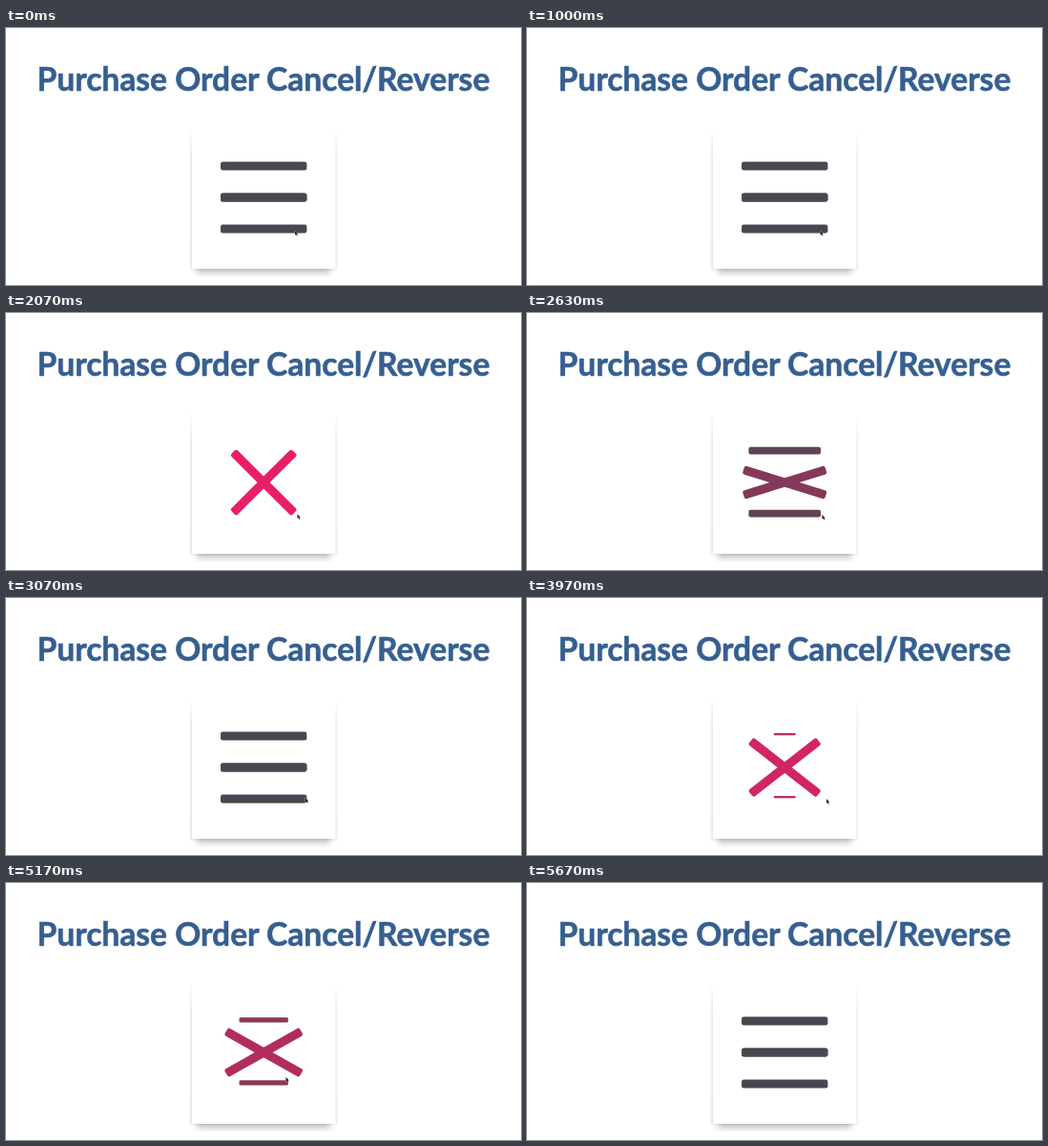
Write an HTML page that moves like this. It is 540x270 px and loops after 6030 ms.

```html
<!DOCTYPE html>
<html lang="en">
<head>
<meta charset="utf-8">
<title>Purchase Order Cancel/Reverse</title>
<style>
  html, body { margin: 0; width: 100%; height: 100%; overflow: hidden; background: #fff; }
  svg { display: block; width: 540px; height: 270px; }
  text {
    font: bold 33.6px Lato, Carlito, sans-serif; text-anchor: middle;
    fill: #365f91; stroke: #365f91; stroke-width: .6px;
  }
</style>
</head>
<body>
<svg viewBox="0 0 540 270">
  <defs>
    <clipPath id="area"><rect x="192" y="104" width="156" height="158"/></clipPath>
    <filter id="soft" x="-20%" y="-40%" width="140%" height="180%"><feGaussianBlur stdDeviation="3.2"/></filter>
    <filter id="edge" x="-20%" y="-20%" width="140%" height="140%"><feGaussianBlur stdDeviation="1"/></filter>
    <linearGradient id="fade" x1="0" y1="104" x2="0" y2="135" gradientUnits="userSpaceOnUse">
      <stop offset="0" stop-color="#000" stop-opacity="0"/>
      <stop offset="1" stop-color="#000" stop-opacity=".09"/>
    </linearGradient>
  </defs>
  <text x="269.9" y="66">Purchase Order Cancel/Reverse</text>
  <g clip-path="url(#area)">
    <rect x="193" y="104" width="154" height="150" fill="url(#fade)" filter="url(#edge)"/>
    <rect x="200" y="225" width="140" height="32.5" fill="#000" fill-opacity=".23" filter="url(#soft)"/>
    <rect x="195" y="104" width="150.5" height="149" rx="1.5" fill="#fff"/>
  </g>
  <g id="bars"></g>
  <path id="cursor" d="M0 0V4.8L1.2 3.9L2 5.7L2.8 5.3L2 3.6H3.3Z" fill="#222" stroke="#fff" stroke-width=".6" stroke-opacity=".7" paint-order="stroke"/>
</svg>
<script>
const LOOP = 6030, FRAME = 100 / 3, EASE = 800;
const CX = 270.2, CY = 178, GAP = 33;
const DARK = [70, 74, 80], PINK = [234, 30, 105];

// Each cycle opens forward, then plays the same timeline backwards;
// the outer bars follow the cross after a short lag.
const cycles = [
  { open: 1207, end: 2689, lag: 35 },
  { open: 3751, end: 5289, lag: 57 }
];

// Cursor keys: time, x, y
const path = [
  [0, 303, 212.9], [867, 303, 212.9], [1000, 307.5, 212.9], [1400, 307.5, 212.9],
  [1800, 305.5, 211.2], [2067, 305.5, 211.2], [2500, 308, 212.4], [3067, 314, 209.9],
  [3767, 314, 209.9], [3967, 314, 211], [4367, 303, 203.6], [4667, 303, 203.6],
  [5167, 293.5, 203.8], [5300, 296, 204], [5667, 333, 206.5]
];
const CURSOR_OUT = 5660;

const group = document.getElementById('bars');
const cursor = document.getElementById('cursor');
const bars = [0, 1, 2, 3].map(() => {
  const bar = document.createElementNS('http://www.w3.org/2000/svg', 'rect');
  const box = { x: -45.2, y: -4.6, width: 90.4, height: 9.2, rx: 2.4 };
  for (const key in box) bar.setAttribute(key, box[key]);
  return group.appendChild(bar);
});

const clamp = v => Math.max(0, Math.min(1, v));
const expoOut = v => v <= 0 ? 0 : v >= 1 ? 1 : 1 - 2 ** (-10 * v);
const progress = ms => expoOut(clamp(ms / EASE));
const mix = p => `rgb(${DARK.map((c, i) => Math.round(c + (PINK[i] - c) * p))})`;

function place(bar, p, transform) {
  bar.setAttribute('fill', mix(p));
  bar.setAttribute('transform', transform);
}

function pose(t) {
  const c = cycles.find(c => t >= c.open && t < c.end);
  if (!c) return { turn: 0, shrink: 0 };
  const head = Math.min(t - c.open, c.end - t);
  return { turn: progress(head), shrink: progress(head - c.lag) };
}

function cursorAt(t) {
  const i = Math.max(1, path.findIndex(k => k[0] > t));
  const [a, b] = [path[i - 1], path[i]];
  const u = clamp((t - a[0]) / (b[0] - a[0]));
  return [a[1] + (b[1] - a[1]) * u, a[2] + (b[2] - a[2]) * u];
}

function draw(ms) {
  const t = Math.floor((ms % LOOP + 3.4) / FRAME) * FRAME;
  const { turn, shrink } = pose(t);
  const scale = 1 - shrink;
  [-1, 1].forEach((side, i) => {
    const y = CY + side * GAP - 2.6 * shrink;
    place(bars[i], shrink, `translate(${CX} ${y}) scale(${scale})`);
    bars[i].style.display = scale < 0.012 ? 'none' : '';
    place(bars[i + 2], turn, `translate(${CX} ${CY}) rotate(${side * 45 * turn})`);
  });
  const shown = t < CURSOR_OUT;
  cursor.style.display = shown ? '' : 'none';
  if (shown) cursor.setAttribute('transform', `translate(${cursorAt(t)})`);
}

const start = performance.now();
function tick() {
  draw(performance.now() - start);
  requestAnimationFrame(tick);
}
tick();
</script>
</body>
</html>
```
